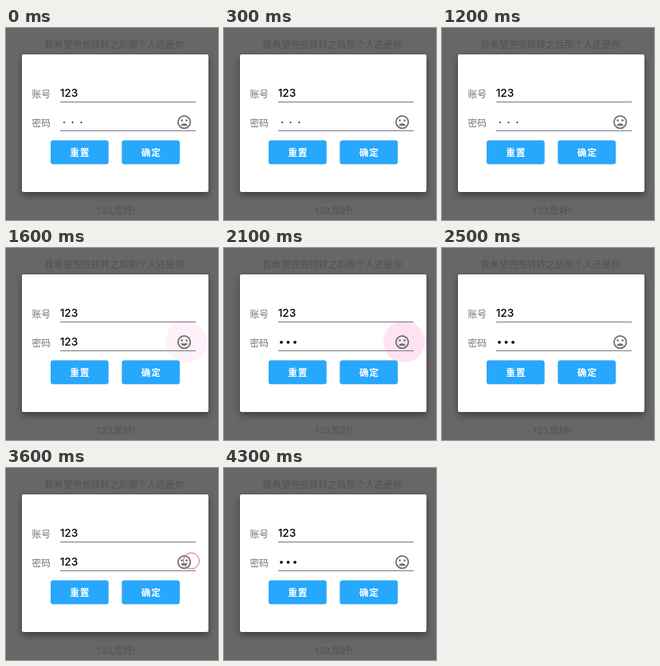
An HTML page for the animation above (4.4 s loop, 266 px wide and 240 px high).

```html
<!DOCTYPE html>
<html lang="zh-CN">
<head>
<meta charset="utf-8">
<title>登录</title>
<style>
html, body { margin: 0; width: 100%; height: 100%; overflow: hidden; background: #686668; }
svg { display: block; width: 100vw; height: 100vh; }
text { font: 11.7px Roboto, "Noto Sans CJK SC", "Noto Sans CJK", sans-serif; }
.behind { fill: #525052; text-anchor: middle; }
.label { fill: #717171; }
.value { font: 500 13.6px Inter, sans-serif; fill: #000; }
.button { fill: #fff; font-weight: 700; letter-spacing: .8px; text-anchor: middle; }
.line { stroke: #7d777d; }
.card { filter: drop-shadow(0 4px 4px #0006); }
.raised { filter: drop-shadow(0 .5px .6px #0003); }
</style>
</head>
<body>
<svg viewBox="0 0 266 240">
  <rect width="266" height="240" fill="#686668"/>
  <text class="behind" x="136" y="24.5">我希望兜兜转转之后那个人还是你</text>
  <text class="behind" x="137.5" y="231.5">123,您好!</text>
  <rect class="card" x="20" y="33" width="234" height="172" rx="2" fill="#fff"/>

  <circle id="ripple" cx="226" cy="117" fill="#ffdcf0"/>

  <text class="label" x="32.5" y="86.8">账号</text>
  <text class="value" x="67.7" y="86">123</text>
  <path class="line" d="M68 92.5H238"/>

  <text class="label" x="32.5" y="123">密码</text>
  <g id="small" fill="#111">
    <circle cx="73" cy="118" r=".95"/><circle cx="83.5" cy="118" r=".95"/><circle cx="94.5" cy="118" r=".95"/>
  </g>
  <g id="bold" fill="#000">
    <circle cx="72" cy="117.8" r="1.9"/><circle cx="80.5" cy="117.8" r="1.9"/><circle cx="89" cy="117.8" r="1.9"/>
  </g>
  <text id="plain" class="value" x="67.7" y="122">123</text>
  <path class="line" d="M68 128.5H238"/>

  <g transform="translate(223.6 117.6) scale(.86)" fill="#6c6c6c">
    <circle r="9" fill="none" stroke="#6c6c6c" stroke-width="2"/>
    <circle cx="-3.5" cy="-2.5" r="1.5"/><circle cx="3.5" cy="-2.5" r="1.5"/>
    <path id="sad" d="M-5.1 5.5a5.5 5.5 0 0 1 10.2 0z"/>
    <path id="smile" d="M-5.1 2a5.5 5.5 0 0 0 10.2 0z"/>
  </g>
  <circle id="touch" cx="232.5" cy="116" r="10" fill="none" stroke="#e0607c"/>

  <g fill="#27a8fc" class="raised">
    <rect x="56" y="140.5" width="72.6" height="29.8" rx="3"/>
    <rect x="145.4" y="140.5" width="72.6" height="29.8" rx="3"/>
  </g>
  <text class="button" x="92.8" y="160.4">重置</text>
  <text class="button" x="182.2" y="160.4">确定</text>
</svg>
<script>
const LOOP = 4400, STEP = 100;
const taps = [1300, 1900, 2600, 3600];
const RELEASE = 100, GROW = 200, HOLD = 200, FADE = 200;
const part = id => document.getElementById(id);
const show = (id, on) => part(id).style.display = on ? "" : "none";
const clamp = v => Math.min(1, Math.max(0, v));

function draw(t) {
  // Every released tap toggles the password's visibility.
  const toggles = taps.filter(tap => t >= tap + RELEASE).length;
  const visible = toggles % 2 === 1;
  show("small", toggles === 0);
  show("bold", toggles > 0 && !visible);
  show("plain", visible);
  show("smile", visible);
  show("sad", !visible);

  const age = t - (taps.filter(tap => t >= tap).pop() ?? -LOOP);
  show("touch", age < RELEASE);
  const growth = 1 - (1 - clamp(age / GROW)) ** 2;
  part("ripple").setAttribute("r", 26 * growth);
  part("ripple").setAttribute("opacity", .8 * (1 - clamp((age - HOLD) / FADE)));
}

const start = performance.now();
function tick() {
  const t = (performance.now() - start) % LOOP;
  draw(Math.floor(t / STEP) * STEP);
  requestAnimationFrame(tick);
}
tick();
</script>
</body>
</html>
```
